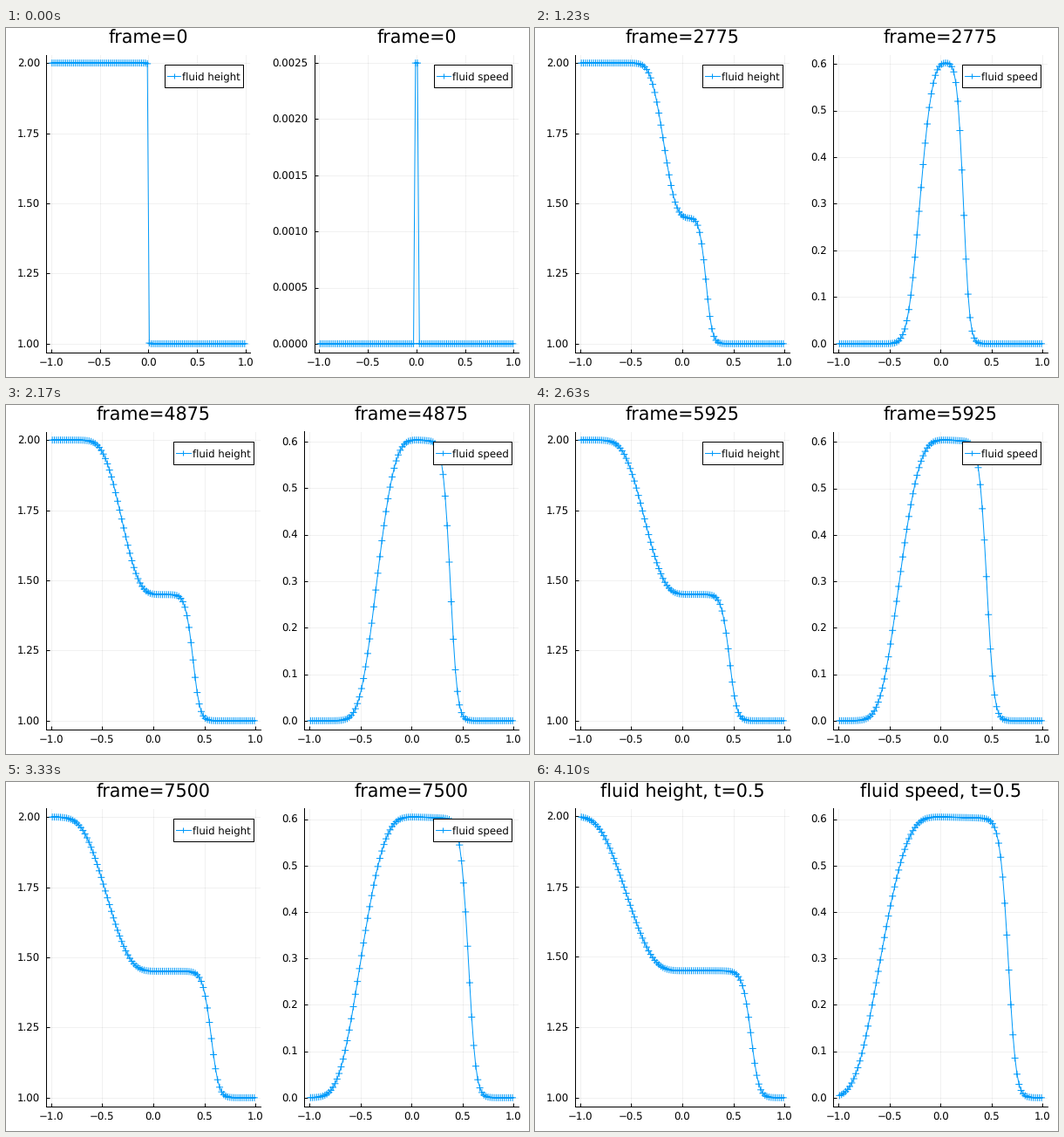
Write a matplotlib script that moves like this. It is 600 px wide and 400 px high and loops after 4.13 s.

```python
import numpy as np
import matplotlib.pyplot as plt
from matplotlib.animation import FuncAnimation
from matplotlib.patches import Rectangle

W, H, DPI = 600, 400, 100
SHOTS, LOOP_MS, STRIDE = 124, 4130, 75
TICKS = 2 * SHOTS  # two ticks per shot, so changes can fall on a half step
T_END = 0.5
BLUE = "#009afa"
PX = 72 / DPI  # points per pixel
SMALL, LARGE = 11.8 * PX, 20.65 * PX
LEFT, RIGHT, TOP, BOTTOM = 46.2, 588, 30.5, 371.5
XLIM = 1.0494
ARM = 4  # half size of a cross in pixels

plt.rcParams["font.family"] = "DejaVu Sans"
plt.rcParams["text.hinting"] = "none"

# Dam break: shallow water with g = 1, first-order Rusanov fluxes
CELLS = 100
DX = 2 / CELLS
x = -1 + DX * (np.arange(CELLS) + 0.5)


def advance(q, dt):
    p = np.concatenate((q[:, :1], q, q[:, -1:]), axis=1)
    h, m = p
    u = m / h
    f = np.array((m, m * u + 0.5 * h * h))
    s = np.abs(u) + np.sqrt(h)
    a = np.maximum(s[:-1], s[1:])
    flux = 0.5 * (f[:, :-1] + f[:, 1:]) - 0.5 * a * (p[:, 1:] - p[:, :-1])
    return q - dt / DX * (flux[:, 1:] - flux[:, :-1])


def simulate():
    q = np.array((np.where(x < 0, 2.0, 1.0), np.zeros(CELLS)))
    t, n, states = 0.0, 0, []
    while t < T_END:
        dt = min(DX / (300 + 272 * t), T_END - t)
        q = advance(q, dt)
        t += dt
        if n % STRIDE == 0 and len(states) < SHOTS - 1:
            states.append(q)
        n += 1
    while len(states) < SHOTS:
        states.append(q)
    return states


def crosses(y, dx, dy):
    """Plus signs at (x, y) as one broken line."""
    gap = np.full(CELLS, np.nan)
    xs = np.column_stack((x - dx, x + dx, gap, x, x, gap))
    ys = np.column_stack((y, y, gap, y - dy, y + dy, gap))
    return xs.ravel(), ys.ravel()


states = simulate()

fig = plt.figure(figsize=(W / DPI, H / DPI), dpi=DPI, facecolor="white")
over = fig.add_axes([0, 0, 1, 1], zorder=5)
over.set_xlim(0, W)
over.set_ylim(H, 0)
over.set_autoscale_on(False)
over.axis("off")


class Panel:
    def __init__(self, name, text_width):
        self.name, self.text_width = name, text_width
        self.ax = ax = fig.add_axes([0.1, 0.1, 0.3, 0.8])
        ax.spines[["top", "right"]].set_visible(False)
        ax.spines[["left", "bottom"]].set_linewidth(PX)
        ax.tick_params(direction="in", length=4 * PX, width=PX,
                       labelsize=SMALL, pad=7 * PX)
        ax.grid(color="black", alpha=0.055, linewidth=PX)
        ax.set_axisbelow(True)
        ticks = np.linspace(-1, 1, 5)
        ax.set_xticks(ticks, [f"{v:.1f}".replace("-", "\u2212") for v in ticks])
        ax.set_xlim(-XLIM, XLIM)
        style = dict(color=BLUE, linewidth=PX)
        self.curve, = ax.plot(x, x, **style)
        self.marks, = ax.plot([], [], snap=False, solid_capstyle="butt", **style)

        self.title = over.text(0, 18, "", size=LARGE, ha="center", va="baseline")
        self.box = over.add_patch(Rectangle((0, 42.4), 1, 26, facecolor="white",
                                            edgecolor="black", linewidth=PX))
        self.key, = over.plot([0, 0, 0], [55, 55, 55], marker="+", markevery=[1],
                              markersize=6 * PX, markeredgewidth=PX, **style)
        self.label = over.text(0, 59.3, name, size=SMALL, va="baseline")

    def place(self, left, width):
        self.width = width
        self.ax.set_position([left / W, 1 - BOTTOM / H,
                              width / W, (BOTTOM - TOP) / H])
        self.title.set_x(left + width / 2)
        sym = 0.1 * width
        box_w = self.text_width + sym
        x0 = left + width - 8.2 - box_w
        self.box.set_x(x0)
        self.box.set_width(box_w)
        a, b = x0 + 3, x0 + 0.08 * width
        self.key.set_xdata([a, (a + b) / 2, b])
        self.label.set_x(x0 + sym - 2.7)

    def show(self, y, step, digits, title, legend):
        lo, hi = y.min(), y.max()
        pad = 0.03 * (hi - lo)
        lo, hi = lo - pad, hi + pad
        self.curve.set_ydata(y)
        self.marks.set_data(*crosses(y, ARM * 2 * XLIM / self.width,
                                     ARM * (hi - lo) / (BOTTOM - TOP)))
        ticks = step * np.arange(np.ceil(lo / step), np.floor(hi / step) + 1)
        self.ax.set_yticks(ticks, [f"{abs(v):.{digits}f}" for v in ticks])
        self.ax.set_ylim(lo, hi)
        self.title.set_text(title)
        for item in (self.box, self.key, self.label):
            item.set_visible(legend)


height = Panel("fluid height", 67.1)
speed = Panel("fluid speed", 65.1)


def speed_ticks(peak):
    if peak < 0.01:
        return 0.0005, 4
    return (0.05, 2) if peak < 0.3 else (0.1, 1)


def draw(tick):
    i = min((tick + 1) // 2, SHOTS - 1)
    h, m = states[i]
    step, digits = speed_ticks(m.max())
    width = 245.6 - 3.8 * (digits - 1)
    height.place(LEFT, width)
    speed.place(RIGHT - width, width)

    last = i == SHOTS - 1
    for panel, y, s, d in ((height, h, 0.25, 2), (speed, m, step, digits)):
        title = f"{panel.name}, t={T_END}" if last else f"frame={i * STRIDE}"
        panel.show(y, s, d, title, not last)
    return []


anim = FuncAnimation(fig, draw, frames=TICKS, init_func=lambda: draw(0),
                     interval=LOOP_MS / TICKS, repeat=True, repeat_delay=0)
plt.show()
```
